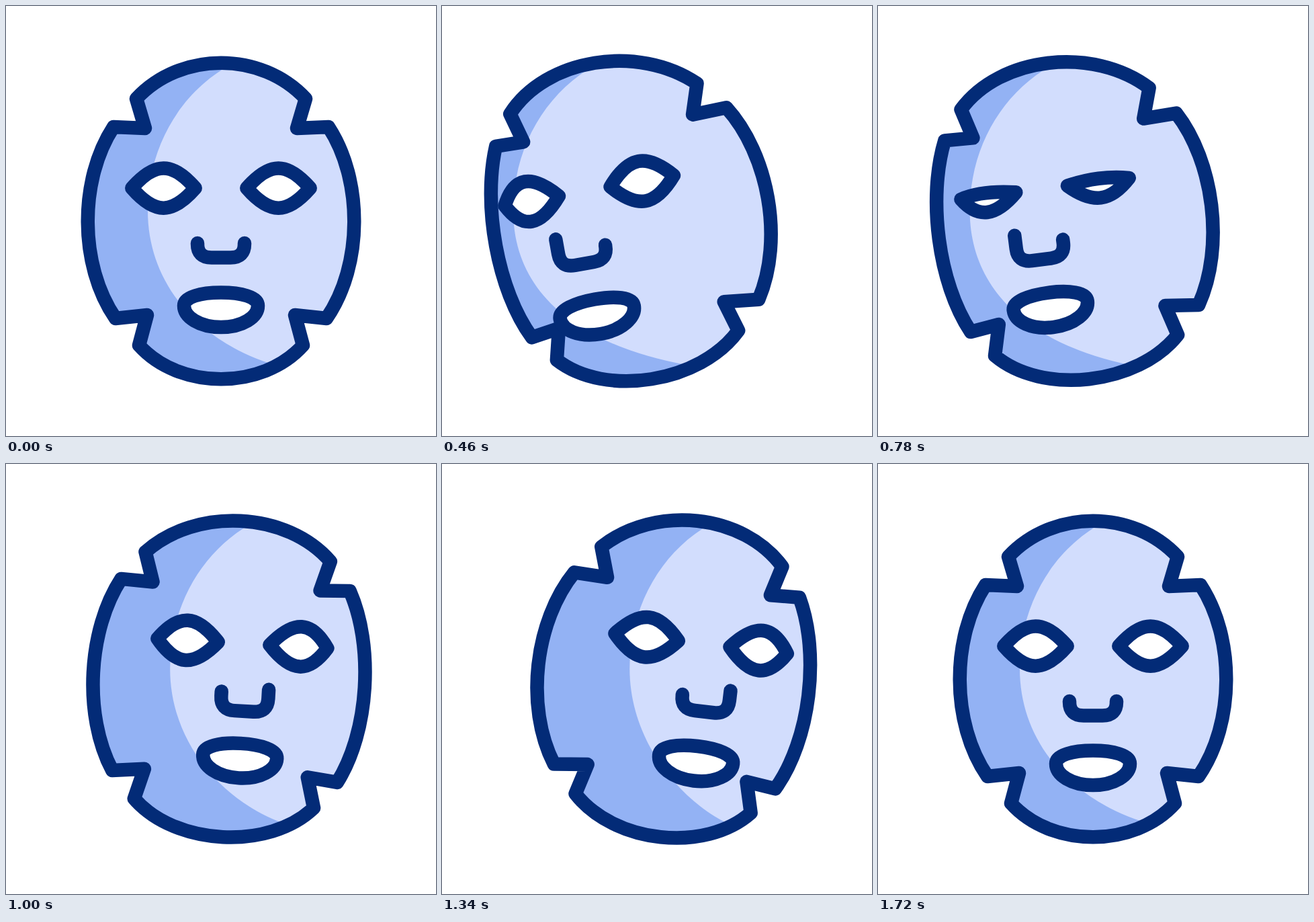
Write an HTML page that moves like this. It is 640x640 px and loops after 2400 ms.

```html
<!DOCTYPE html>
<html lang="en">
<head>
<meta charset="utf-8">
<title>Sheet mask</title>
<style>
  html, body { margin: 0; width: 100%; height: 100%; overflow: hidden; background: #fff; }
  svg { display: block; width: 100%; height: 100%; }
  .line { stroke: #032b77; stroke-width: 20.5; stroke-linecap: round; stroke-linejoin: round; }
</style>
</head>
<body>
<svg viewBox="0 0 640 640">
  <clipPath id="clip"><path id="inside"/></clipPath>
  <path id="base" fill="#93b2f4"/>
  <path id="light" fill="#d2ddfd" clip-path="url(#clip)"/>
  <path id="rim" class="line" fill="none"/>
  <path id="eyeL" class="line" fill="#fff"/>
  <path id="eyeR" class="line" fill="#fff"/>
  <path id="nose" class="line" fill="none"/>
  <path id="mouth" class="line" fill="#fff"/>
</svg>
<script>
const LOOP = 2400, STEP = 20;
const LEFT_AT = 595, RIGHT_AT = 1195, REST_AT = 1720;
const LEFT_REACH = 1.15, RIGHT_REACH = .8;
const MID = 320, HALF_WIDTH = 198, ROLL = .18;

// Points use x from the middle of the face and y from the top of the stage.
const rimSide = [[60, 67], [126, 138], [113, 182], [160, 180], [211, 258],
  [212, 385], [157, 465], [110, 460], [122, 505], [62, 572]];
const mouthSide = [[0, 426.5], [30, 426.5], [55, 433], [55, 446], [55, 463], [32, 478], [0, 478]];
const shadeEdge = [[25, 82], [-55, 120], [-109, 205], [-109, 305], [-109, 415], [-30, 505], [90, 537]];

// How far each feature slides with the turn, sinks with it, and rises mid-swing.
const eyeMove = { slide: 99, sink: 5, rise: .3 };
const noseMove = { slide: 118, sink: 9, rise: .5 };
const mouthMove = { slide: 112, sink: 10, rise: 1 };

const SIZE = { M: 1, L: 1, Q: 2, C: 3, Z: 0 };
const $ = id => document.getElementById(id);
const mirror = points => points.map(([x, y]) => [-x, y]).reverse();

function ease(t, from, to) {
  const u = Math.min(1, Math.max(0, (t - from) / (to - from)));
  return u * u * (3 - 2 * u);
}

function headPose(t) {
  const across = ease(t, LEFT_AT, RIGHT_AT);
  const left = LEFT_REACH * ease(t, 0, LEFT_AT) * (1 - across);
  const right = RIGHT_REACH * across * (1 - ease(t, RIGHT_AT, REST_AT));
  return {
    left, right,
    turn: right - left,
    lift: 40 * across * (1 - across),
    blink: ease(t, 600, 800) - ease(t, 800, 1000)
  };
}

const tilt = ([x, y], pose, dx, dy) => [
  MID + x + dx - ROLL * pose.turn * (y - MID),
  y + dy + ROLL * pose.turn * x
];

// The rim slides most near its middle and widens a little as it turns.
function placeRim(p, pose) {
  const u = p[0] / HALF_WIDTH;
  const slide = 38 + 15 * (1 - u * u);
  const widen = 26 * u * (1.2 - u * u);
  return tilt(p, pose, slide * pose.turn + widen * (pose.left + pose.right), 0);
}

const placeFeature = (p, pose, move) =>
  tilt(p, pose, move.slide * pose.turn, -move.sink * pose.turn - move.rise * pose.lift);

function toPath(cmds, points) {
  let i = 0;
  return [...cmds].map(c => c + points.slice(i, i += SIZE[c])
    .map(p => p[0].toFixed(2) + ' ' + p[1].toFixed(2)).join(' ')).join('');
}

function rimPath(pose) {
  const ring = [...rimSide.slice(1), ...mirror(rimSide), rimSide[0], rimSide[1]];
  return toPath('MLLCLLCLLCLLCZ', ring.map(p => placeRim(p, pose)));
}

// The shadow edge slides level; its lower end stays close to the chin.
function lightPath(pose) {
  const last = shadeEdge.length - 1;
  const edge = shadeEdge.map(([x, y], i) => [MID + x + (i < last ? 105 : 30) * pose.turn, y]);
  return toPath('MCCLLZ', [...edge, [700, 640], [700, 0]]);
}

function eyePath(pose, side) {
  const far = side < 0 ? pose.left : pose.right;
  const wide = s => s * (47.2 - (s === side ? 14 * far : 0));
  const upper = -39.5 * (1 - .86 * pose.blink);
  const lower = 39.5 * (1 - .2 * pose.blink);
  const lens = [[wide(-1), 0], [-13, upper], [13, upper],
    [wide(1), 0], [13, lower], [-13, lower], [wide(-1), 0]];
  return toPath('MCCZ', lens.map(([x, y]) => placeFeature([85.5 * side + x, 271 + y], pose, eyeMove)));
}

// The far side of the nose grows longer.
function nosePath(pose) {
  const end = (side, far) => [35 * side, 353 - 21 * far];
  const curve = [[14, 374.5], [35, 374.5], [35, 354]];
  const points = [end(-1, pose.left), ...mirror(curve), ...curve, end(1, pose.right)];
  return toPath('MLQLQL', points.map(p => placeFeature(p, pose, noseMove)));
}

function mouthPath(pose) {
  const ring = [...mouthSide, ...mirror(mouthSide).slice(1)];
  return toPath('MCCCCZ', ring.map(p => placeFeature(p, pose, mouthMove)));
}

function draw(t) {
  const pose = headPose(t);
  const rim = rimPath(pose);
  const shapes = {
    inside: rim, base: rim, rim,
    light: lightPath(pose),
    eyeL: eyePath(pose, -1),
    eyeR: eyePath(pose, 1),
    nose: nosePath(pose),
    mouth: mouthPath(pose)
  };
  for (const id in shapes) $(id).setAttribute('d', shapes[id]);
}

function tick() {
  const t = performance.now() % LOOP;
  draw(Math.floor(t / STEP) * STEP);
  requestAnimationFrame(tick);
}
tick();
</script>
</body>
</html>
```
